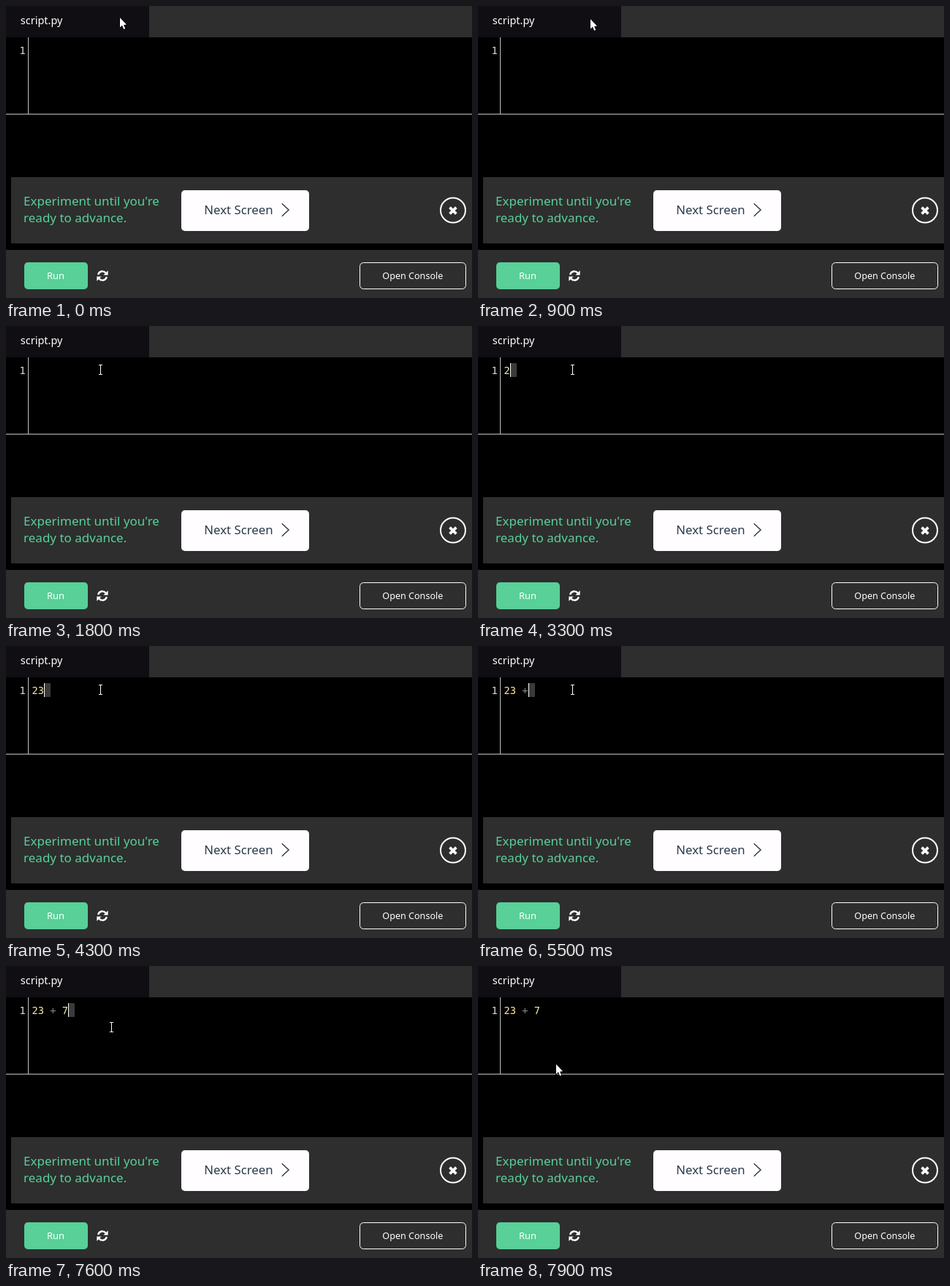
Write an HTML page that moves like this. It is 638x401 px and loops after 8000 ms.

```html
<!DOCTYPE html>
<html lang="en">
<head>
<meta charset="utf-8">
<title>Code editor</title>
<style>
  html, body { margin: 0; width: 100%; height: 100%; overflow: hidden; background: #000; }
  svg { display: block; width: 638px; height: 401px; }
  text { font-family: "Noto Sans", "Open Sans", sans-serif; fill: #fff; white-space: pre; }
  .code { font: 13.7px "DejaVu Sans Mono", "Noto Sans Mono", monospace; }
  .digits { fill: #fbe9a9; }
  .sign { fill: #858585; }
  .hint { font-size: 17px; fill: #58d098; }
  .grey { fill: #2e2e2e; }
  .rule { fill: #c0c0c0; }
  .line { fill: none; stroke: #fff; }
</style>
</head>
<body>
<svg viewBox="0 0 638 401">
  <defs>
    <g id="turn">
      <path d="M126.2 369 A5.9 5.9 0 0 1 136.5 366.5" class="line" stroke-width="2.4"/>
      <path d="M139.6 363.2 V369.4 H133.4 Z" fill="#fff"/>
    </g>
  </defs>

  <rect width="638" height="401"/>
  <rect class="grey" width="638" height="43"/>
  <rect width="196" height="43" fill="#100e12"/>
  <text x="19.8" y="25" font-size="14.5">script.py</text>

  <rect class="rule" x="30" y="43" width="1" height="105"/>
  <rect class="rule" y="148" width="638" height="1"/>
  <text class="code" x="18.6" y="66" style="fill:#ddd">1</text>
  <g id="caret">
    <rect y="51" width="9" height="19" fill="#3a3a3a"/>
    <rect y="51" width="1" height="19" fill="#fff"/>
  </g>
  <text class="code digits" id="code" x="35.6" y="66"></text>

  <rect class="grey" x="7" y="235" width="631" height="91"/>
  <text class="hint" x="24.1" y="274">Experiment until you're</text>
  <text class="hint" x="24.1" y="297">ready to advance.</text>
  <rect x="240" y="253" width="175" height="56" rx="5" fill="#fffdff"/>
  <text x="271.3" y="286" font-size="16.8" style="fill:#2b3c4d">Next Screen</text>
  <path d="M377.8 271.3 L387 280 L377.8 288.7" fill="none" stroke="#2b3c4d" stroke-width="1.5"/>
  <circle class="line" cx="612" cy="280.5" r="17" stroke-width="2"/>
  <path class="line" d="M607.6 276.6 L616.4 285.4 M616.4 276.6 L607.6 285.4" stroke-width="3.7"/>

  <rect class="grey" y="335" width="638" height="66"/>
  <rect x="25" y="352" width="87" height="37" rx="5" fill="#58d098"/>
  <text x="56" y="375" font-size="13">Run</text>
  <use href="#turn"/>
  <use href="#turn" transform="rotate(180 132 370.5)"/>
  <rect class="line" x="484.5" y="352.5" width="145" height="36" rx="5"/>
  <text x="515.3" y="375" font-size="12.6">Open Console</text>

  <path id="arrow" d="M0 0 V13.4 L3 10.6 L5.1 15.8 L7.3 14.9 L5.1 9.9 L9 9.5 Z"
        fill="#fff" stroke="#000" stroke-width="1.6" paint-order="stroke" stroke-linejoin="round"/>
  <path id="beam" class="line" d="M-2.5 -6.5 H2.5 M0 -6.5 V6.5 M-2.5 6.5 H2.5"/>
</svg>
<script>
const LOOP = 8000, STEP = 100;
const SOURCE = "23 + 7", ADVANCE = 8.25;
const FOCUS = 2180, BLINK = 560;
const KEYS = [3280, 4220, 4950, 5450, 5750, 6140];

const $ = id => document.getElementById(id);
const [code, caret, arrow, beam] = ["code", "caret", "arrow", "beam"].map($);
const show = (el, on) => el.setAttribute("visibility", on ? "visible" : "hidden");
const place = (el, x, y) => el.setAttribute("transform", `translate(${x} ${y})`);

// Quadratic curve from a to c, bent towards b.
function glide(k, a, b, c) {
  k = Math.min(1, Math.max(0, k));
  return a.map((v, i) => Math.round((1 - k) ** 2 * v + 2 * k * (1 - k) * b[i] + k * k * c[i]));
}

const REST = [129, 60];
const pointerAt = t => t < 7400
  ? glide((t - 800) / 1000, [156, 16], [146, 25], REST)
  : glide((t - 7400) / 500, REST, [168, 85], [107, 135]);

let typed = -1;
function drawCode(t) {
  const count = KEYS.filter(key => key <= t).length;
  if (count !== typed) {
    typed = count;
    code.innerHTML = SOURCE.slice(0, count).replace("+", '<tspan class="sign">+</tspan>');
    place(caret, Math.floor(36 + count * ADVANCE), 0);
  }
  // Each key restarts the blinking.
  const since = t - (KEYS[count - 1] ?? FOCUS);
  show(caret, since >= 0 && Math.floor(since / BLINK) % 2 === 0);
}

function drawPointer(t) {
  const [x, y] = pointerAt(t);
  const editing = y > 43 && y < 95;
  show(beam, editing);
  show(arrow, !editing);
  if (editing) place(beam, x + 0.5, y);
  else place(arrow, x, y);
}

const start = performance.now();
function tick() {
  const elapsed = (performance.now() - start) % LOOP;
  const t = Math.floor(elapsed / STEP) * STEP;
  drawCode(t);
  drawPointer(t);
  requestAnimationFrame(tick);
}
tick();
</script>
</body>
</html>
```
